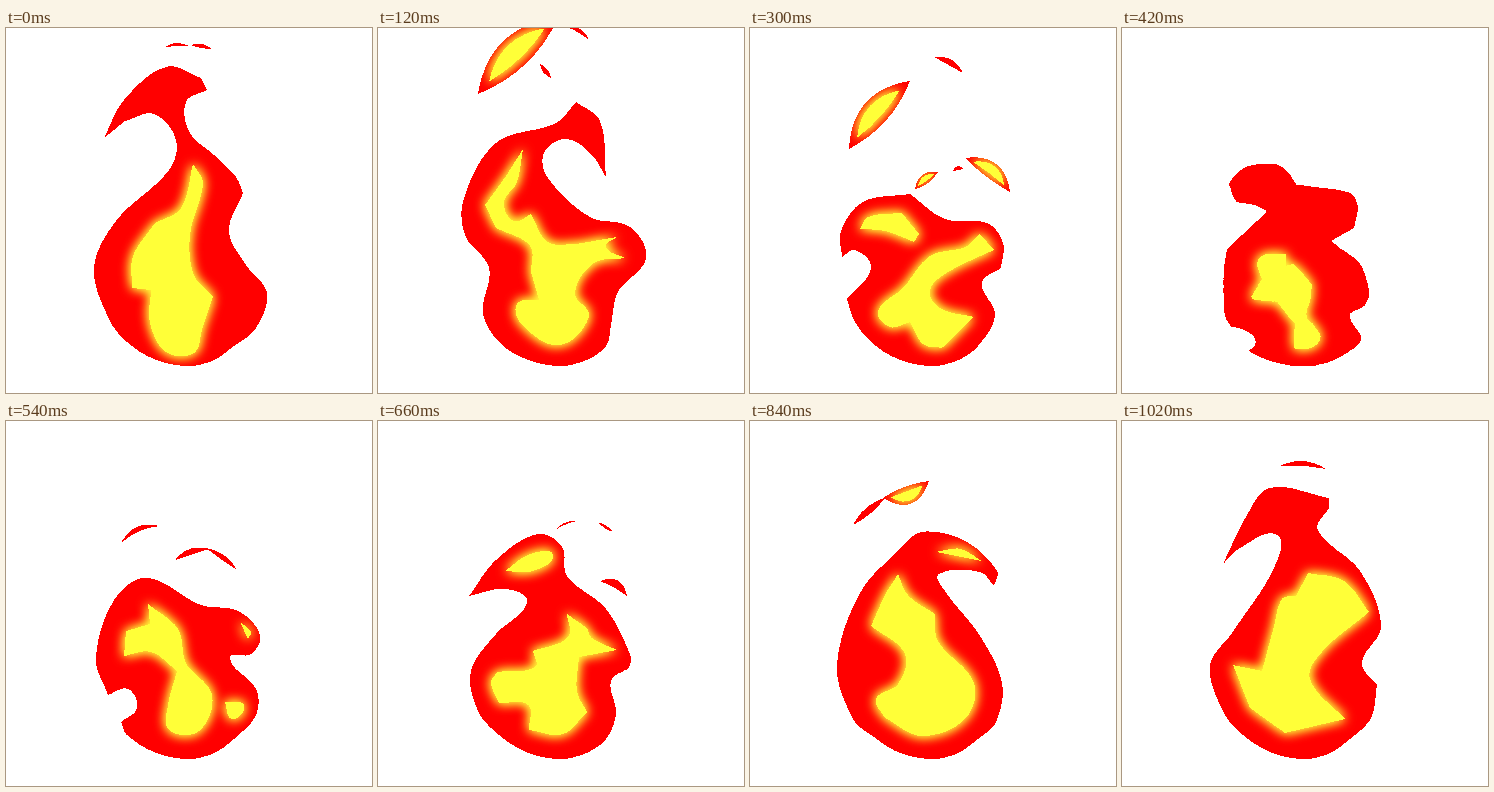
An HTML page with a canvas that plays this animation: 366x365 px, repeating every 1080 ms.

```html
<!DOCTYPE html>
<html lang="en">
<head>
<meta charset="utf-8">
<title>Flame</title>
<style>
html, body { margin: 0; width: 100%; height: 100%; overflow: hidden; background: #fff; }
canvas { display: block; }
</style>
</head>
<body>
<canvas id="stage" width="366" height="365"></canvas>
<script>
const LOOP = 1080, STEP = 60;
const SPEED = 0.42;            // rise in px per ms
const BASE = 339, SOFT = 70;   // the rise eases in above the base
const GLOW = 6, REACH = 60;
const LEFT = 68, TOP = -40, W = 216, H = 406;
const RED = [255, 0, 0], YELLOW = [255, 255, 56];

// Every body stands on this bowl, right to left
const bowl = '228,318 206,333 180,338 148,331 121,314';

// Key poses. body and core: points of smooth closed curves, "!" marks a corner.
// wisps: two ends, then bend and thickness.
const poses = [
  { t: 0,
    body: `103,291 88,240 110,193 163,142 170,112 148,86 119,93! 98,110! 118,72 160,39 195,50! 201,62! 180,74
      184,105 208,127 230,149 237,165! 223,203 240,237 261,265 250,300`,
    core: `187,136! 197,155 184,207 188,247 207,268! 196,302 188,325 160,324 144,295 145,262! 126,260! 127,228
      149,195! 175,180`,
    wisps: '159,19 183,18 2,3 / 185,17 206,21 1,4' },
  { t: 120,
    body: `105,285 111,240 87,207 86,170 118,115 178,95 198,74! 222,93 228,149! 213,126 188,111 166,125 170,150
      212,189 252,199 268,230 240,264 233,297`,
    core: `145,121! 139,154 126,175 136,193 153,186! 170,214 198,216! 239,209! 228,219 247,230! 216,235 197,265
      211,288 182,317 145,298 139,276 161,272! 153,244! 152,218 118,200! 107,177! 128,148!`,
    wisps: '100,66 180,-10 5,32 / 189,-1 211,12 3,4 / 162,36 173,50 0,5' },
  { t: 300,
    body: `104,292 97,271! 121,240 105,222 92,229! 91,203 113,174 160,166! 195,191 237,195 253,215 251,240!
      232,255 245,287`,
    core: `110,201! 118,189 152,185! 169,206! 164,214! 135,203
      / 230,206! 244,222! 200,243 180,262 190,280 224,289! 192,320! 173,316 160,294! 140,299 128,283 153,260
      180,228 215,219`,
    wisps: `99,121 160,53 5,27 / 215,130 260,164 6,16 / 165,161 188,144 2,10 / 184,29 213,45 3,6
      / 203,143 214,141 2,4` },
  { t: 540,
    body: `115,301! 131,287 122,268 102,274! 90,238 107,181 140,157 195,184 232,190 254,214 245,233 224,237
      250,268 250,294`,
    core: `142,183! 172,208 180,242 206,274 193,310 163,309 162,284 171,250! 145,231 118,235! 120,210! 144,203!
      / 234,201! 245,211 242,218! / 219,281! 238,284 226,298`,
    wisps: '115,122 154,105 6,5 / 169,139 203,128 3,6 / 200,127 231,149 2,5' },
  { t: 660,
    body: `100,290 93,250 118,213 149,181 128,168 91,175! 118,139 160,113 184,126 189,155 228,188 253,236
      251,247! 233,260 238,292`,
    core: `127,150! 152,133 175,134 155,150 / 189,193! 209,207! 214,217 239,229! 201,236! 199,270 209,291!
      185,313 151,309! 150,284 121,282! 113,262 119,251! 157,246 155,230! 190,216`,
    wisps: '177,109 199,100 2,2 / 220,101 235,111 0,3 / 222,160 249,175 5,8' },
  { t: 840,
    body: `103,298 87,245 110,172 150,128 172,111 215,120 247,150 244,165! 230,151 189,153 195,170 230,215
      252,262 246,301`,
    core: `186,131! 210,128 232,140! / 148,153! 158,174 185,193! 188,220 224,262 215,298 172,315 135,297!
      126,278 148,263 155,233 121,205! 135,174`,
    wisps: '103,104 135,77 1,7 / 133,77 179,60 -6,18' },
  { t: 1020,
    body: `102,292 88,245 110,212 152,147 155,114 118,127 101,143! 125,94 148,67 207,77! 207,87! 196,109
      238,150 259,205 240,242 255,264! 249,297`,
    core: `186,152! 222,160 247,191! 200,231 188,258 223,298! 163,312! 128,287! 111,244! 140,250! 152,205
      160,178 174,175!`,
    wisps: '158,45 204,48 4,5' }
];

function makeLayer(w, h) {
  const c = document.createElement('canvas');
  c.width = w;
  c.height = h;
  return c.getContext('2d', { willReadFrequently: true });
}

const stage = document.getElementById('stage');
const ctx = stage.getContext('2d');
const layer = makeLayer(stage.width, stage.height);
const ink = makeLayer(W, H);
ink.translate(-LEFT, -TOP);

const parse = text => text.split('/').map(part => part.trim().split(/\s+/).map(s => {
  const [x, y] = s.split(',').map(parseFloat);
  return { x, y, corner: s.endsWith('!') };
}));

// Bezier handle at p, heading from p towards q, along the chord a-b
function handle(p, q, a, b) {
  const len = Math.hypot(q.x - p.x, q.y - p.y) / 3;
  if (p.corner) { a = p; b = q; }
  const chord = Math.hypot(b.x - a.x, b.y - a.y) || 1;
  return [p.x + (b.x - a.x) / chord * len, p.y + (b.y - a.y) / chord * len];
}

function fillBlob(pts) {
  const n = pts.length;
  ink.beginPath();
  ink.moveTo(pts[0].x, pts[0].y);
  pts.forEach((p, i) => {
    const prev = pts[(i + n - 1) % n], q = pts[(i + 1) % n], next = pts[(i + 2) % n];
    ink.bezierCurveTo(...handle(p, q, prev, q), ...handle(q, p, next, p), q.x, q.y);
  });
  ink.fill();
}

// Curved lens between a and b; inset pulls both ends inwards
function fillWisp([a, b, form], inset = 0, scale = 1) {
  const dx = b.x - a.x, dy = b.y - a.y, len = Math.hypot(dx, dy);
  const at = (u, off) => [a.x + dx * u + dy / len * off, a.y + dy * u - dx / len * off];
  const sag = 1 - 2 * inset, half = form.y * scale;
  const start = at(inset, form.x * (1 - sag)), end = at(1 - inset, form.x * (1 - sag));
  ink.beginPath();
  ink.moveTo(...start);
  ink.quadraticCurveTo(...at(0.5, 2 * form.x + half), ...end);
  ink.quadraticCurveTo(...at(0.5, 2 * form.x - half), ...start);
  ink.fill();
}

// Chamfer distance to the pixels where the mask equals want
const hops = [[1, 1], [W, 1], [W - 1, Math.SQRT2], [W + 1, Math.SQRT2]];
for (const jump of [W - 2, W + 2, 2 * W - 1, 2 * W + 1]) hops.push([jump, Math.sqrt(5)]);

function distance(mask, want) {
  const d = new Float32Array(W * H);
  const edge = 2 * W + 2, last = W * H - edge;
  for (let i = 0; i < d.length; i++) d[i] = mask[i] === want ? 0 : 999;
  const relax = (i, dir) => {
    let best = d[i];
    if (!best) return;
    for (let k = 0; k < hops.length; k++) {
      const v = d[i - dir * hops[k][0]] + hops[k][1];
      if (v < best) best = v;
    }
    d[i] = best;
  };
  for (let i = edge; i < last; i++) relax(i, 1);
  for (let i = last - 1; i >= edge; i--) relax(i, -1);
  return d;
}

// Signed distance, negative inside whatever paint() fills
function field(paint) {
  ink.clearRect(LEFT, TOP, W, H);
  paint();
  const px = ink.getImageData(0, 0, W, H).data;
  const mask = new Uint8Array(W * H);
  for (let i = 0; i < mask.length; i++) mask[i] = px[i * 4 + 3] > 127 ? 1 : 0;
  const out = distance(mask, 1), inside = distance(mask, 0);
  return out.map((v, i) => Math.max(-REACH, Math.min(REACH, v - inside[i])));
}

const keys = poses.map(pose => {
  const wisps = parse(pose.wisps);
  return {
    t: pose.t,
    red: field(() => {
      parse(pose.body + ' ' + bowl).forEach(fillBlob);
      wisps.forEach(w => fillWisp(w));
    }),
    yellow: field(() => {
      parse(pose.core).forEach(fillBlob);
      // Only thick wisps keep a hot core
      wisps.filter(w => w[2].y >= 10).forEach(w => fillWisp(w, 0.15, 0.55));
    })
  };
});
keys.push({ ...keys[0], t: LOOP });

// Height that a point at y had ms earlier
function rewind(y, ms) {
  const s = BASE - y;
  if (s <= 0) return y;
  const f = (s < SOFT ? SOFT * Math.log(s / SOFT) : s - SOFT) - SPEED * ms;
  return BASE - (f < 0 ? SOFT * Math.exp(f / SOFT) : f + SOFT);
}

function row(y) {
  const r = Math.max(2, Math.min(H - 4, y - TOP));
  const i = Math.floor(r + 1e-6);
  return { at: i * W, mix: Math.max(0, r - i) };
}

const sample = (f, r, x) => f[r.at + x] * (1 - r.mix) + f[r.at + W + x] * r.mix;

// Paints one colour of the flame at time t on the layer
function paintLayer(name, colour, t) {
  const k = keys.findIndex((key, i) => t < keys[i + 1].t);
  const a = keys[k], b = keys[k + 1];
  const u = (t - a.t) / (b.t - a.t);
  const img = layer.createImageData(stage.width, stage.height);
  for (let y = 0; y < stage.height; y++) {
    const ra = row(rewind(y, t - a.t)), rb = row(rewind(y, t - b.t));
    for (let x = 3; x < W - 3; x++) {
      const d = sample(a[name], ra, x) * (1 - u) + sample(b[name], rb, x) * u;
      if (d < 0) img.data.set([...colour, 255], (y * stage.width + x + LEFT) * 4);
    }
  }
  layer.putImageData(img, 0, 0);
}

function stamp(mode, blur = 0) {
  ctx.globalCompositeOperation = mode;
  ctx.filter = blur ? `blur(${blur}px)` : 'none';
  ctx.drawImage(layer.canvas, 0, 0);
}

function draw(t) {
  paintLayer('red', RED, t);
  stamp('copy');
  paintLayer('yellow', YELLOW, t);
  stamp('source-atop', GLOW);
  stamp('source-atop', GLOW);
  stamp('source-atop');
}

let shown = -1;
function tick(now) {
  const step = Math.floor((now % LOOP) / STEP + 1e-6) % (LOOP / STEP);
  if (step !== shown) draw(step * STEP);
  shown = step;
  requestAnimationFrame(tick);
}
draw(0);
requestAnimationFrame(tick);
</script>
</body>
</html>
```
